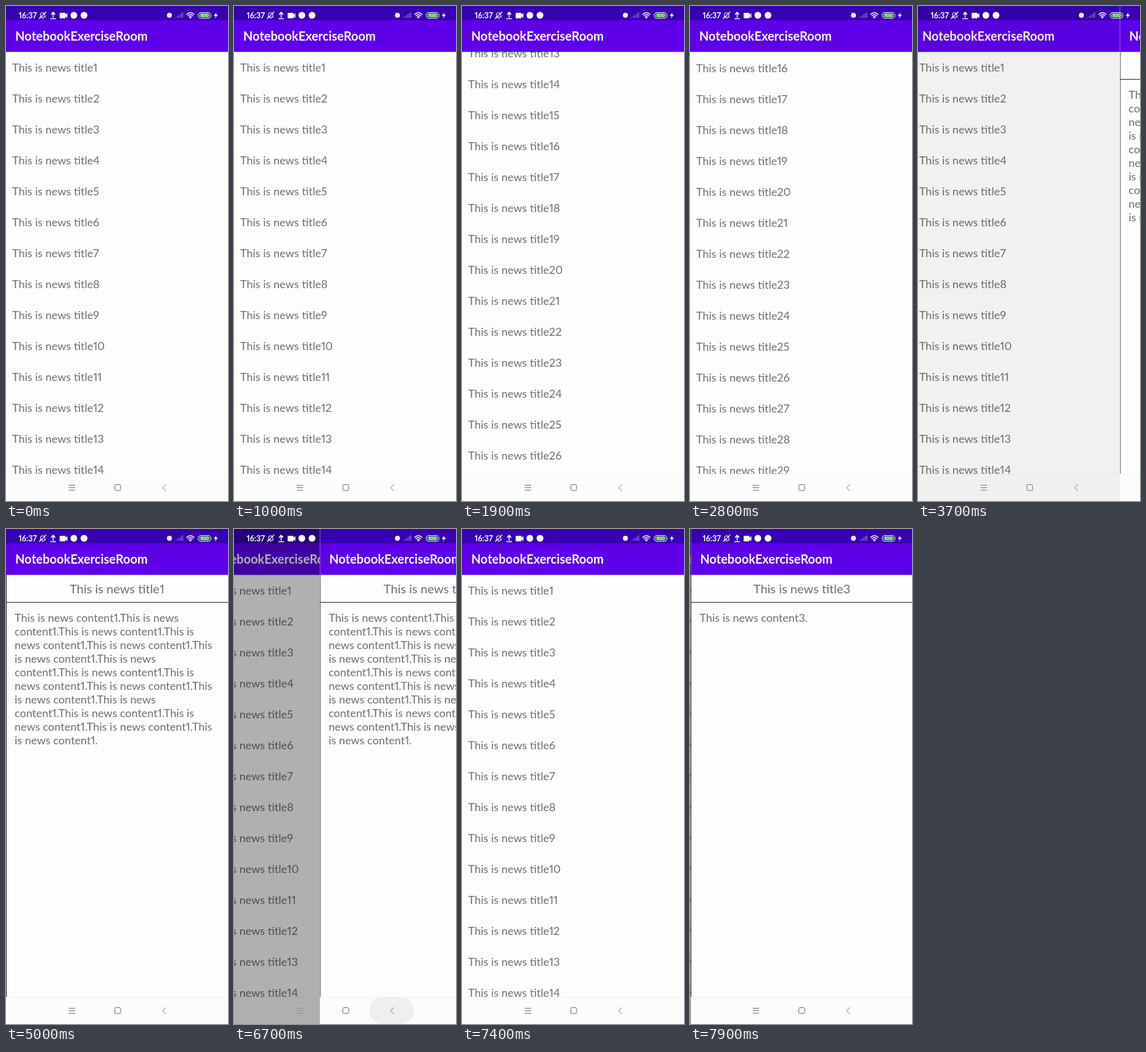
Recreate the animation shown at these times as an HTML page. Size 360 px wide and 800 px high, loop 8000 ms.

```html
<!DOCTYPE html>
<html lang="en">
<head>
<meta charset="utf-8">
<title>News list</title>
<style>
html, body { margin: 0; width: 100%; height: 100%; overflow: hidden; background: #fdfdfd; }
#stage {
  position: relative; width: 360px; height: 800px; overflow: hidden;
  font: 18px/22px Lato, "Open Sans", sans-serif; font-variant-numeric: proportional-nums;
  color: #6f6f6f; white-space: pre;
}
#stage > *, .page > * { position: absolute; }
.page { left: 0; top: 0; width: 360px; height: 800px; overflow: hidden; background: #fdfdfd; }
.status { left: 0; top: 0; width: 100%; height: 23px; background: #3700b2; }
.bar {
  left: 0; top: 23px; width: 345px; height: 51px; padding-left: 15px;
  background: #5e00e9; color: #fff; font-size: 20px; font-weight: 700; line-height: 51px;
  box-shadow: 0 1px 2px rgba(0, 0, 0, .22);
}
.foot { left: 0; top: 756px; width: 100%; height: 44px; background: #fcfcfc; }
.foot.lined { box-shadow: inset 0 1px #f0f0f0; }
.view { left: 0; top: 74px; width: 100%; height: 682px; overflow: hidden; }
.row { height: 50px; line-height: 50px; padding-left: 10px; }
.edge { left: 0; top: 74px; width: 1px; height: 682px; background: #222; }
.rule { left: 0; top: 118px; width: 100%; height: 1px; background: #222; }
.head { left: 0; top: 74px; width: 100%; line-height: 45px; font-size: 20px; text-align: center; }
.body { left: 14px; top: 132px; }
#dim { left: 0; top: 0; width: 360px; height: 800px; background: #000; }
#press { left: 219px; top: 756px; width: 73px; height: 44px; border-radius: 22px; background: #efefef; }
svg { left: 0; top: 0; }
</style>
</head>
<body>
<div id="stage">
  <div class="page" id="list"></div>
  <div id="dim"></div>
  <div class="page" id="detail"></div>
  <div id="press"></div>
  <svg width="360" height="800" fill="none" stroke-linecap="round" stroke-linejoin="round">
    <g fill="#fff" font-family="Lato, sans-serif" font-weight="700">
      <text x="20.5" y="19.5" font-size="12.5">16:37</text>
      <g stroke="#fff" stroke-width="1.1" fill="none">
        <path d="M55 18h9M56 17.500v-3a3.500 3.500 0 0 1 7 0v3M58.500 20h2M54 20.500L65 9.500"/>
        <path d="M72.500 20.500h8M76.500 18v-7M73.500 13.500l3-3.500 3 3.500" stroke-width="1.6"/>
      </g>
      <path d="M88 11h7.500q1 0 1 1v2l3-2.500v8l-3-2.500v2q0 1-1 1H88q-1 0-1-1v-7q0-1 1-1z"/>
      <circle cx="110" cy="15" r="5.500"/>
      <circle cx="126.500" cy="15" r="5.500"/>
      <circle cx="265" cy="15" r="4"/>
      <path d="M275 19v-1M278 19v-3M281 19v-5M284 19v-7M286.500 19v-9" stroke="#fff" stroke-width="1.5" opacity=".4" stroke-linecap="butt"/>
      <path d="M293 13.500q6-5.500 12 0M295 15.800q4-3.600 8 0M297 18q2-1.800 4 0" stroke="#fff" stroke-width="1.400" fill="none"/>
      <circle cx="299" cy="19.300" r="1"/>
      <rect x="311.500" y="10.500" width="21" height="9.500" rx="4.500" fill="none" stroke="#fff"/>
      <rect x="313" y="12" width="18" height="6.500" rx="3.200" fill="#3fae3c"/>
      <text x="322" y="18" font-size="7.500" text-anchor="middle">100</text>
      <path d="M341.500 10l-4.500 6h3l-1.500 4.500 5-6.500h-3z"/>
    </g>
    <g stroke="#6c6c6c" stroke-width="1">
      <path id="menu" d="M102 774.500h9.500M102 778.500h9.500M102 782.500h9.500"/>
      <rect x="176.500" y="773.500" width="9.500" height="9.500" rx="2"/>
      <path d="M259 773.500l-5 5 5 5"/>
    </g>
  </svg>
</div>
<script>
const $ = id => document.getElementById(id);
const LOOP = 8000, STEP = 100, WIDTH = 360;

const chrome = inner =>
  `${inner}<div class="status"></div><div class="bar">NotebookExerciseRoom</div><div class="foot"></div>`;

const rows = Array.from({ length: 50 }, (_, i) =>
  `<div class="row">This is news title${i + 1}</div>`).join('');
$('list').innerHTML = chrome(`<div class="view"><div id="rows">${rows}</div></div>`);
$('detail').innerHTML = chrome(
  '<div class="head"></div><div class="body"></div><div class="rule"></div><div class="edge"></div>');

const cycle = [
  'content1.This is news content1.This is',
  'news content1.This is news content1.This',
  'is news content1.This is news'
].join('\n');
const longText = ['This is news content1.This is news', cycle, cycle, cycle]
  .join('\n').replace(/This is news$/, '');

const head = $('detail').querySelector('.head');
const body = $('detail').querySelector('.body');
const feet = document.querySelectorAll('.foot');

// Distance covered by a fling that slows down exponentially
const fling = (t, start, reach) => t < start ? 0 : reach * (1 - Math.exp((start - t) / 272));

// Critically damped spring, from 1 to 0
const spring = (t, start) => {
  const p = Math.max(0, t - start) * 0.02;
  return (1 + p) * Math.exp(-p);
};

function scrollAt(t) {
  const down = fling(Math.min(t, 2650), 1740, 1400);
  return Math.max(0, down - fling(t, 2650, 1420));
}

// Share of the stage covered by the detail page
function coverAt(t) {
  if (t < 6633) return 1 - spring(t, 3675);
  if (t < 7515) return spring(t, 6633);
  return 1 - spring(t, 7515);
}

function draw(t) {
  const cover = coverAt(t), x = WIDTH * (1 - cover), dim = cover / 2;
  const second = t > 7500;
  head.textContent = `This is news title${second ? 3 : 1}`;
  body.textContent = second ? 'This is news content3.' : longText;
  $('rows').style.transform = `translateY(${-Math.round(scrollAt(t))}px)`;
  $('list').style.transform = `translateX(${-WIDTH * cover / 4}px)`;
  $('detail').style.transform = `translateX(${Math.abs(x) < 0.3 ? 0 : x}px)`;
  $('dim').style.opacity = dim;
  $('menu').style.opacity = x > 106 ? 1 - 1.6 * dim : 1;
  $('press').style.opacity = t < 6700 ? 0 : Math.max(0, 1 - (t - 6700) / 400);
  feet.forEach(f => f.classList.toggle('lined', t > 1740));
}

const begin = performance.now();
function tick() {
  const t = (performance.now() - begin) % LOOP;
  draw(Math.floor(t / STEP) * STEP);
  requestAnimationFrame(tick);
}
tick();
</script>
</body>
</html>
```
